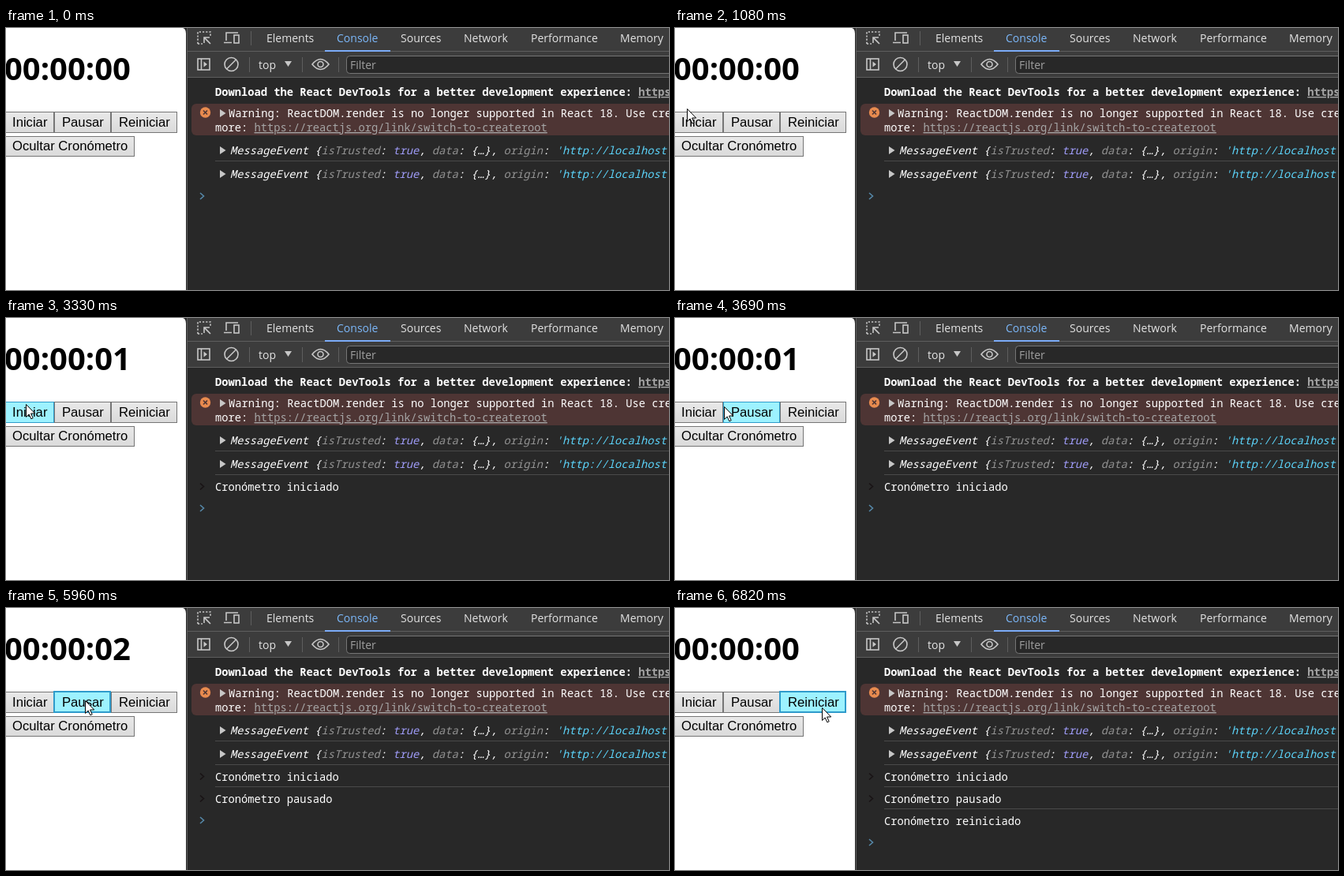
Recreate the animation shown at these times as an HTML page. Size 840 by 332 pixels, loop 8000 ms.

```html
<!DOCTYPE html>
<html lang="es">
<head>
<meta charset="utf-8">
<title>Cronómetro</title>
<style>
  html, body { margin: 0; width: 100%; height: 100%; overflow: hidden; background: #282828; }
  svg { display: block; width: 840px; height: 332px; }
  text { white-space: pre; }
  .heading { font: bold 40px "Open Sans", sans-serif; }
  .button rect { fill: url(#face); stroke: #767676; }
  .button.hover rect { fill: #9df2ff; stroke: #2f9bcb; }
  .button.pressed rect { stroke-width: 2; transform: translate(-.5px, -.5px); }
  .button text { font: 16.67px "Liberation Sans", Arial, sans-serif; }
  .ui { font: 14px "Open Sans", sans-serif; fill: #e3e3e3; }
  .mono { font: 13.75px "Noto Sans Mono", monospace; fill: #fff; }
  .bold { font-weight: bold; }
  .italic { font-style: italic; }
  .key { fill: #939393; }
  .bool { fill: #9f9cf8; }
  .string { fill: #5cd5fb; }
  .link { fill: #a5a5a5; text-decoration: underline; }
  .rule { stroke: #4a4a4a; }
  .edge { stroke: #5e5e5e; }
  .icon { fill: none; stroke: #c7c7c7; stroke-width: 1.6; }
  .solid { fill: #c7c7c7; }
  .chevron { fill: none; stroke-width: 1.6; }
</style>
</head>
<body>
<svg viewBox="0 0 840 332">
  <defs>
    <linearGradient id="face" x2="0" y2="1">
      <stop stop-color="#e9e9e9"/><stop offset="1" stop-color="#dadada"/>
    </linearGradient>
    <path id="chevron" class="chevron" d="M246-4l4.5 4-4.5 4"/>
    <path id="expand" class="solid" d="M271-5l7.500 5-7.500 5z"/>
  </defs>

  <rect width="840" height="332" fill="#282828"/>
  <path d="M0 0H224Q228 1 228 7V332H0z" fill="#fff"/>
  <text id="clock" class="heading" x="-2" y="66">00:00:00</text>
  <g id="buttons"></g>

  <rect x="230" width="610" height="62" fill="#3c3c3c"/>
  <path class="edge" d="M229.5 0V332M230 29.5H840M230 62.5H840M310.5 4V22M308.5 37V56M375.5 37V56M421.5 37V56"/>
  <rect x="404" y="28" width="83" height="2" fill="#7cacf8"/>
  <g id="tabs" class="ui"></g>

  <g class="icon">
    <path d="M243 20V5H259V11M243 20H249" stroke-dasharray="2.2 2"/>
    <path d="M259 20L251 12M251 19V12H258"/>
    <path d="M279 16V6H294M276 18.5H286"/>
    <rect x="289" y="9" width="6" height="10"/>
    <rect x="243" y="39" width="15" height="14"/>
    <path d="M247.5 39V53"/>
    <circle cx="285.500" cy="46" r="8.500"/>
    <path d="M291.500 40L279.500 52"/>
    <path d="M388 46Q398.500 33 409 46Q398.500 59 388 46z"/>
    <circle cx="398.500" cy="46" r="3.500"/>
  </g>
  <path class="solid" d="M250.500 42.500l4.500 3.500-4.500 3.500zM353 42h9l-4.500 7z"/>
  <text class="ui" x="320" y="52">top</text>
  <rect x="431.500" y="35.500" width="420" height="22" rx="4" fill="#282828" stroke="#757575"/>
  <text class="ui" x="436" y="52" style="fill:#a0a0a0">Filter</text>

  <g class="mono">
    <text class="bold" x="265" y="86">Download the React DevTools for a better development experience: <tspan class="link">https://reactjs.org</tspan></text>
    <rect x="235" y="96" width="620" height="40" rx="6" fill="#4e3534"/>
    <circle cx="252.500" cy="107" r="6.700" fill="#e88b4f"/>
    <path d="M250 104.500l5 5m0-5l-5 5" stroke="#4e3534" stroke-width="1.600"/>
    <use href="#expand" y="108"/>
    <text x="282" y="113">Warning: ReactDOM.render is no longer supported in React 18. Use createRoot</text>
    <text x="265" y="131">more: <tspan class="link">https://reactjs.org/link/switch-to-createroot</tspan></text>
    <path class="rule" d="M265 168.500H840"/>
    <g id="event">
      <use href="#expand" y="155"/>
      <text class="italic" x="284" y="160">MessageEvent {<tspan class="key">isTrusted</tspan>: <tspan class="bool">true</tspan>, <tspan class="key">data</tspan>: {…}, <tspan class="key">origin</tspan>: <tspan class="string">'http://localhost</tspan></text>
    </g>
    <use href="#event" y="30"/>
    <g id="logs"></g>
  </g>
  <use id="prompt" href="#chevron" stroke="#5688a8"/>
  <path id="pointer" d="M.5.500V16.500L4.200 13 6.800 18.800 9.200 17.800 6.600 12H11.700z" fill="#fff" stroke="#000"/>
</svg>

<script>
const LOOP = 8000;
const byId = id => document.getElementById(id);

byId('tabs').innerHTML = [
  ['Elements', 330], ['Console', 419], ['Sources', 500],
  ['Network', 580], ['Performance', 665], ['Memory', 778]
].map(([name, x]) =>
  `<text x="${x}" y="18"${name === 'Console' ? ' style="fill:#7cb8fa"' : ''}>${name}</text>`
).join('');

const buttons = [
  { label: 'Iniciar', left: -3, right: 61, top: 106, bottom: 133, textX: 8, press: [1490, 1700] },
  { label: 'Pausar', left: 61, right: 133, top: 106, bottom: 133, textX: 71, press: [4470, 6570] },
  { label: 'Reiniciar', left: 133, right: 217, top: 106, bottom: 133, textX: 143, press: [6570, LOOP] },
  { label: 'Ocultar Cronómetro', left: -3, right: 163, top: 137, bottom: 163, textX: 8, press: [0, 0] }
];
byId('buttons').innerHTML = buttons.map(b => `<g class="button">
  <rect x="${b.left + .5}" y="${b.top + .5}" width="${b.right - b.left - 1}" height="${b.bottom - b.top - 1}"/>
  <text x="${b.textX}" y="${b.bottom - 8}">${b.label}</text></g>`).join('');
buttons.forEach((b, i) => b.node = byId('buttons').children[i]);

const logs = [[1700, 'iniciado'], [4700, 'pausado'], [6800, 'reiniciado']];
byId('logs').innerHTML = logs.map(([, word], i) => `<g>
  <path class="rule" d="M265 ${198.5 + 28 * i}H840"/>
  ${i < 2 ? `<use href="#chevron" y="${213.5 + 28 * i}" stroke="#191315"/>` : ''}
  <text x="265" y="${219 + 28 * i}">Cronómetro ${word}</text></g>`).join('');
const logNodes = [...byId('logs').children];

// Pointer path: time, x, y
const path = [
  [240, 659, 320], [440, 420, 230], [640, 190, 140], [840, 60, 93], [940, 22, 87],
  [1040, 13, 99], [1080, 15, 102], [1220, 23, 109], [3310, 23, 109], [3690, 62, 112],
  [4140, 94, 116], [5940, 94, 116], [5960, 100, 117], [6230, 186, 126], [LOOP, 186, 126]
];

function pointerAt(t) {
  const i = path.findIndex(p => p[0] > t);
  const [t0, x0, y0] = path[i - 1], [t1, x1, y1] = path[i];
  const k = (t - t0) / (t1 - t0);
  return [Math.round(x0 + (x1 - x0) * k), Math.round(y0 + (y1 - y0) * k)];
}

function draw(t) {
  const visible = t >= 240;
  const [x, y] = visible ? pointerAt(t) : [-50, -50];
  byId('pointer').setAttribute('transform', `translate(${x} ${y})`);

  for (const b of buttons) {
    const hover = x >= b.left && x < b.right && y >= b.top && y < b.bottom;
    b.node.classList.toggle('hover', hover);
    b.node.classList.toggle('pressed', hover && t >= b.press[0] && t < b.press[1]);
  }

  const seconds = t >= 6800 ? 0 : (t >= 2650) + (t >= 3710);
  byId('clock').textContent = `00:00:0${seconds}`;

  const count = logs.filter(([start]) => t >= start).length;
  logNodes.forEach((node, i) => node.style.display = i < count ? '' : 'none');
  byId('prompt').setAttribute('y', 213 + 28 * count);
}

const start = performance.now();
function tick() {
  draw((performance.now() - start) % LOOP);
  requestAnimationFrame(tick);
}
tick();
</script>
</body>
</html>
```
